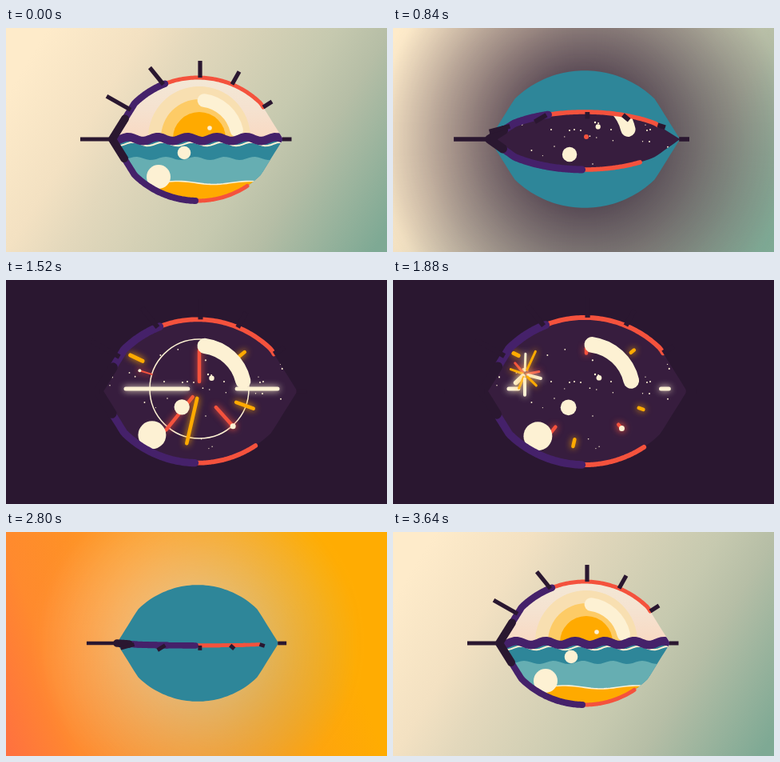
Write an HTML page with a canvas that moves like this. It is 477 px wide and 280 px high and loops after 3.68 s.

```html
<!DOCTYPE html>
<html lang="en">
<head>
<meta charset="utf-8">
<title>Day and night eye</title>
<style>
  html, body { margin: 0; width: 100%; height: 100%; overflow: hidden; background: #2a1730; }
  canvas { display: block; }
</style>
</head>
<body>
<canvas id="stage" width="477" height="280"></canvas>
<script>
const W = 477, H = 280, LOOP = 3680;
const CX = 240, CY = 139;            // eye centre
const HALF = 107, TALL = 77;         // eye half width and half height
const R = (HALF * HALF + TALL * TALL) / (2 * TALL);
const CORNER = 1.6;                  // slope of the straight corners
const INK = '#2a1730', NIGHT = '#371d3e', PURPLE = '#45216a', RED = '#f4523d',
      ORANGE = '#ffaa00', CREAM = '#fdf1d3', TEAL = '#2e8699', AQUA = '#66aeb2';
const ctx = document.getElementById('stage').getContext('2d');

const clamp = v => Math.max(0, Math.min(1, v));
const span = (t, a, b) => clamp((t - a) / (b - a));
const smooth = u => u * u * (3 - 2 * u);
const rad = deg => deg * Math.PI / 180;

function keyed(t, keys) {
  let i = 1;
  while (i < keys.length - 1 && t > keys[i][0]) i++;
  const [t0, v0] = keys[i - 1], [t1, v1] = keys[i];
  return v0 + (v1 - v0) * span(t, t0, t1);
}

const ZOOM = [[0, 1], [400, 1.047], [840, 1.115], [1520, 1.165], [2280, 1.23],
              [2500, 1.24], [2720, .94], [2800, .946], [3640, 1], [3680, 1]];

function linear(x0, y0, x1, y1, colors) {
  const g = ctx.createLinearGradient(x0, y0, x1, y1);
  colors.forEach(([at, c]) => g.addColorStop(at, c));
  return g;
}
const DAY_SKY = linear(40, 20, 460, 280,
  [[0, '#feebca'], [.21, '#f3e1c2'], [.33, '#e3d8bc'], [.62, '#c6c9af'],
   [.74, '#b6bea6'], [1, '#7ea994']]);
const DAWN = linear(0, 280, 420, 130,
  [[0, '#ff7040'], [.2, '#ff8a2e'], [.6, '#fd9a1c'], [1, '#ffac02']]);

// Stars: a row across the middle and a seeded scatter
const stars = [198, 221, 227, 235, 273, 318, 322].map((x, i) => [x, 127 + i % 2, 1]);
stars.push([253, 118, 1.2], [202, 148, .8], [250, 170, .8], [321, 142, 1]);
let seed = 11;
const random = () => (seed = seed * 16807 % 2147483647) / 2147483647;
for (let i = 0; i < 36; i++)
  stars.push([130 + random() * 225, 58 + random() * 165, .6 + random() * .5]);

// Spokes: angle, inner end, outer end, colour, width, ball at the tip
const BIG = [
  [180, 14, 92, CREAM, 5], [0, 47, 98, CREAM, 5], [-90, 9, 48, RED, 4.5],
  [129, 13, 66, RED, 4.5], [48, 31, 63, RED, 4.5, 3.5], [103, 12, 70, ORANGE, 4.5],
  [20, 49, 72, ORANGE, 4.5], [-39, 60, 73, ORANGE, 4.5], [206, 79, 96, ORANGE, 5],
  [197, 62, 78, RED, 2, 2]];
const LOW = [
  [212, 5, 47, CREAM, 3], [238, 13, 49, ORANGE, 3], [164, 5, 50, RED, 3],
  [137, 4, 37, ORANGE, 3], [-56, 5, 27, RED, 3], [-5, 10, 24, ORANGE, 3],
  [53, 6, 16, ORANGE, 3], [193, 43, 43.5, RED, 5], [250, 32, 32.5, ORANGE, 5]];
const LEFT = [
  [-11, 20, 31, RED, 3], [229, 27, 32, RED, 3], [200, 26, 32, ORANGE, 3],
  [-88, 38, 44, CREAM, 3], [-65, 52, 54, ORANGE, 3], [137, 25, 26, CREAM, 6],
  [113, 31, 32, ORANGE, 3], [90, 43, 44, CREAM, 4], [14, 34, 35, CREAM, 4],
  [44, 33, 34, ORANGE, 3]];
const EDGE = [
  [74, 21, 34, CREAM, 3], [104, 12, 20, ORANGE, 3], [150, 12, 15, ORANGE, 3],
  [200, 16, 26, RED, 3]];
const bursts = [
  { x: 242, y: 136, start: 860, time: 660, ring: 62, line: 1.5, dot: RED, spokes: BIG },
  { x: 165, y: 118, start: 1660, time: 620, ring: 0, dot: ORANGE, spokes: LEFT },
  { x: 342, y: 80, start: 1800, time: 480, ring: 0, dot: CREAM, spokes: EDGE },
  { x: 323, y: 192, start: 2060, time: 220, ring: 29, line: 3.5, dot: CREAM, spokes: LOW },
  { x: 243, y: 137, start: 2300, time: 260, ring: 26, line: 2, dot: CREAM, spokes: LOW },
  { x: 224, y: 208, start: 2300, time: 260, ring: 0, dot: ORANGE, spokes: LEFT }];

function disc(x, y, r, color) {
  ctx.fillStyle = color;
  ctx.beginPath();
  ctx.arc(x, y, r, 0, 7);
  ctx.fill();
}

function stroke(color, width, cap = 'round') {
  ctx.strokeStyle = color;
  ctx.lineWidth = width;
  ctx.lineCap = cap;
  ctx.lineJoin = 'round';
  ctx.stroke();
}

function line(x0, y0, x1, y1, color, width, cap) {
  ctx.beginPath();
  ctx.moveTo(x0, y0);
  ctx.lineTo(x1, y1);
  stroke(color, width, cap);
}

// Height of the lid at x, an arc with straight corners;
// k is -1 for the open upper lid, 1 for the lower
const lidY = (x, k) =>
  k * Math.min(Math.sqrt(R * R - x * x) - R + TALL, CORNER * (HALF - Math.abs(x)));

function trace(x0, x1, y) {
  for (let i = 0; i <= 60; i++) {
    const x = x0 + (x1 - x0) * i / 60;
    ctx.lineTo(x, y(x));
  }
}

function lens(up, low) {
  ctx.beginPath();
  trace(-HALF, HALF, x => lidY(x, -up));
  trace(HALF, -HALF, x => lidY(x, low));
  ctx.closePath();
}

function lid(x0, x1, k, color, width) {
  ctx.beginPath();
  trace(x0, x1, x => lidY(x, k));
  stroke(color, width);
}

// The next backdrop spreads over the previous one from the eye outwards
function backdrop(t) {
  const [under, over, u] =
    t < 1062 ? [DAY_SKY, INK, span(t, 623, 1062)] :
    t < 2633 ? [INK, DAWN, span(t, 2340, 2633)] :
               [DAWN, DAY_SKY, span(t, 2633, 3072)];
  const reach = 530 * u, g = ctx.createRadialGradient(CX, CY, 0, CX, CY, 530);
  for (let r = 0; r <= 530; r += 10)
    g.addColorStop(r / 530, `rgba(0,0,0,${clamp((reach - r) / 250)})`);
  const layer = (mode, fill) => {
    ctx.globalCompositeOperation = mode;
    ctx.fillStyle = fill;
    ctx.fillRect(0, 0, W, H);
  };
  layer('copy', g);
  layer('source-in', over);
  layer('destination-over', under);
  ctx.globalCompositeOperation = 'source-over';
}

function fillBelow(y, color) {
  ctx.beginPath();
  trace(-120, 120, y);
  ctx.lineTo(120, 90);
  ctx.lineTo(-120, 90);
  ctx.fillStyle = color;
  ctx.fill();
}

function seaside(t) {
  const age = t > 2700 ? t - LOOP : t;
  const wave = (y, amp, shift) => x => y - amp * Math.cos((x + 87 - shift + age * .03) * .17);
  ctx.fillStyle = linear(0, -TALL, 0, 0, [[0, '#f3e8d6'], [.5, '#f5e2d0'], [1, '#f9d9c2']]);
  ctx.fillRect(-120, -90, 240, 180);
  disc(2, -2, 64, '#f8dfb1');
  disc(2, -2, 48, '#fdcb66');
  disc(2, -1, 33, ORANGE);
  highlight();
  fillBelow(wave(0, 2.5, 0), TEAL);
  fillBelow(wave(24, 2, 10), AQUA);
  const sand = x => 54.5 - 2 * Math.cos((x + 25) * .07) - age * .0125;
  fillBelow(sand, ORANGE);
  ctx.beginPath();
  trace(-120, 120, sand);
  stroke(CREAM, 1.6);
  ctx.beginPath();
  trace(-120, 120, wave(6, 2.3, 6));
  stroke(CREAM, 2);
  ctx.beginPath();
  trace(-120, 120, wave(-.3, 2.5, 0));
  stroke(PURPLE, 10.5);
  bubbles();
}

function highlight() {
  ctx.beginPath();
  ctx.arc(1, 0, 49, rad(-82), rad(-13));
  stroke(CREAM, 16.5);
  disc(15, -14, 2.8, CREAM);
}

function bubbles() {
  disc(-17, 17, 8.3, CREAM);
  disc(-49, 47, 15, CREAM);
}

function firework(t, b) {
  const q = (t - b.start) / b.time;
  if (t < b.start - 100 || q > 1.7) return;
  if (q < .05) disc(b.x, b.y, 3, b.dot);
  if (q < 0) return;
  const grow = 1 - (1 - Math.min(q, 1)) ** 2, late = Math.max(0, q - 1);
  ctx.save();
  ctx.translate(b.x, b.y);
  ctx.shadowBlur = 9;
  if (b.ring && q < 1.3) {
    ctx.beginPath();
    ctx.arc(0, 0, b.ring * (grow + late * .15), 0, 7);
    stroke(CREAM, (b.line + 2 * (1 - grow)) * (1 - late / .3));
  }
  for (const [angle, inner, outer, color, width, ball] of b.spokes) {
    const head = outer * (grow + late * .1);
    const tail = q < 1 ? inner * q * q : inner + (outer - inner) * late / .6;
    if (tail >= head) continue;
    ctx.shadowColor = color;
    const c = Math.cos(rad(angle)), s = Math.sin(rad(angle));
    line(c * tail, s * tail, c * head, s * head, color, width);
    if (ball) disc(c * head, s * head, ball, CREAM);
  }
  ctx.restore();
}

function nightSky(t, zoom) {
  ctx.fillStyle = NIGHT;
  ctx.fillRect(-150, -110, 300, 220);
  ctx.save();
  ctx.scale(1 / zoom, 1 / zoom);
  ctx.translate(-CX, -CY);
  stars.forEach(([x, y, r]) => disc(x, y, r, CREAM));
  bursts.forEach(b => firework(t, b));
  ctx.restore();
  highlight();
  bubbles();
}

function lids(open, up, low) {
  lid(-41, 82, -up, RED, 5);
  lid(-3, 62, low, RED, 5);
  lid(-91, -41, -up, PURPLE, 8.5);
  lid(-93, -3, low, PURPLE, 8);
  ctx.beginPath();
  trace(-91, -HALF, x => lidY(x, -up));
  trace(-HALF, -92, x => lidY(x, low));
  stroke(INK, 10);
  line(-147, 0, -105, 0, INK, 5, 'butt');
  line(106, 0, 117.5, 0, INK, 5, 'butt');
  const fold = Math.max(-.45 + .15 * (1 - open), 1 - 2.4 * (1 - open));
  const lashes = [[-84, -30, -17], [-43, -17, -21], [3, 0, -21], [43, 9, -16], [82, 11, -7]];
  for (const [x, dx, dy] of lashes) {
    const y = lidY(x, -up);
    line(x, y, x + dx * (.6 + .4 * open), y + dy * fold, INK, 5.2, 'butt');
  }
}

function draw(t) {
  const zoom = keyed(t, ZOOM);
  const open = t < 1500
    ? 1 - smooth(span(t, 480, 700)) + smooth(span(t, 725, 985))
    : 1 - smooth(span(t, 2500, 2700)) + smooth(span(t, 2810, 3100));
  const up = open - .04 * (1 - open), low = open + .04 * (1 - open);

  backdrop(t);
  ctx.save();
  ctx.translate(CX, CY);
  ctx.scale(zoom, zoom);
  if (open < 1) {
    lens(1, 1);
    ctx.fillStyle = TEAL;
    ctx.fill();
  }
  if (open > 0) {
    ctx.save();
    lens(up, low);
    ctx.clip();
    if (t > 712 && t < 2750) nightSky(t, zoom);
    else seaside(t);
    ctx.restore();
  }
  lids(open, up, low);
  ctx.restore();
}

function tick() {
  draw(performance.now() % LOOP);
  requestAnimationFrame(tick);
}
tick();
</script>
</body>
</html>
```
